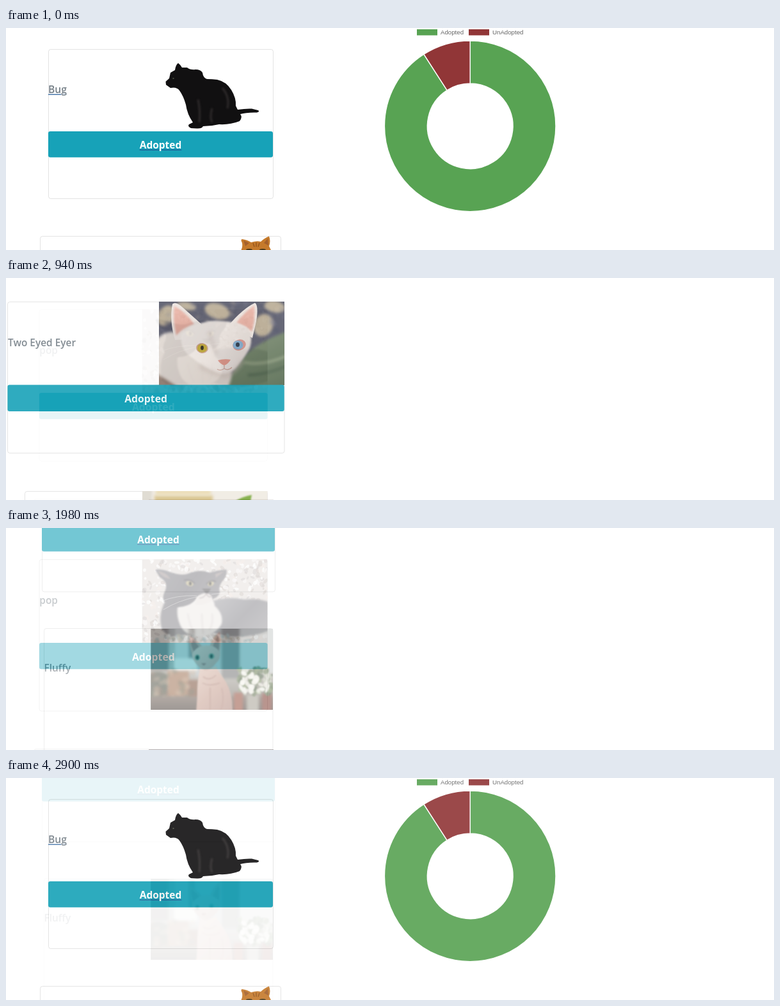
An HTML page with a canvas that plays this animation: 1200x348 px, repeating every 2960 ms.

```html
<!DOCTYPE html>
<html lang="en">
<head>
<meta charset="utf-8">
<title>Cat adoption</title>
<style>
  html, body { margin: 0; width: 100%; height: 100%; overflow: hidden; background: #fff; }
  canvas { display: block; }
</style>
</head>
<body>
<canvas id="stage" width="1200" height="348"></canvas>
<script>
const W = 1200, H = 348;
const HOLD = 200, STEP = 60, SCENE = 740;
const UI = '"Open Sans", "Noto Sans", sans-serif';
const CHART = '"Liberation Sans", Arial, sans-serif';
const TEAL = '#17a2b8', LINK = '#1d5594', GREY = '#757f87';
const GREEN = '#58a353', RED = '#913637';

const stage = document.getElementById('stage').getContext('2d');
let c;

function fill(color, d) {
  c.fillStyle = color;
  c.fill(new Path2D(d));
}

function line(color, width, d) {
  c.strokeStyle = color;
  c.lineWidth = width;
  c.stroke(new Path2D(d));
}

function box(color, x, y, w, h) {
  c.fillStyle = color;
  c.fillRect(x, y, w, h);
}

function oval(color, x, y, rx, ry = rx, turn = 0) {
  c.fillStyle = color;
  c.beginPath();
  c.ellipse(x, y, rx, ry, turn, 0, Math.PI * 2);
  c.fill();
}

function fade(x0, y0, x1, y1, ...colors) {
  const g = c.createLinearGradient(x0, y0, x1, y1);
  colors.forEach((col, i) => g.addColorStop(i / (colors.length - 1), col));
  return g;
}

function soften(px) {
  c.filter = px ? `blur(${px}px)` : 'none';
}

function random(seed) {
  return () => (seed = (seed * 16807) % 2147483647) / 2147483647;
}

// Scatter small blobs over a rectangle.
function specks(seed, n, x, y, w, h, size, colors) {
  const r = random(seed);
  for (let i = 0; i < n; i++) {
    const px = x + r() * w, py = y + r() * h;
    const rx = size * (0.5 + r()), ry = size * (0.4 + r() * 0.7);
    oval(colors[Math.floor(r() * colors.length)], px, py, rx, ry, r() * 3);
  }
}

function label(str, x, y, color, font, back) {
  c.font = font;
  c.textAlign = 'left';
  if (back) {
    // Underline that breaks around descenders
    box(LINK, x, y + 1.6, c.measureText(str).width, 1.2);
    c.strokeStyle = back;
    c.lineWidth = 1.2;
    c.strokeText(str, x, y);
  }
  c.fillStyle = color;
  c.fillText(str, x, y);
}

function card(x, y, right, bottom) {
  c.strokeStyle = 'rgba(0,0,0,.11)';
  c.lineWidth = 1;
  c.beginPath();
  c.roundRect(x, y, right - x, bottom - y, 3.5);
  c.stroke();
}

function button(x, y, right, bottom, base, size, linked) {
  c.fillStyle = TEAL;
  c.beginPath();
  c.roundRect(x, y, right - x, bottom - y, 3.2);
  c.fill();
  const font = `700 ${size}px ${UI}`;
  c.font = font;
  const left = (x + right - c.measureText('Adopted').width) / 2;
  label('Adopted', left, base, '#fff', font, linked && TEAL);
}

function name(str, x, y, size, linked) {
  label(str, x, y, GREY, `600 ${size}px ${UI}`, linked && '#fff');
}

function photo(base, x, y, right, bottom, draw) {
  c.save();
  c.beginPath();
  c.rect(x, y, right - x, bottom - y);
  c.clip();
  box(base, x, y, right - x, bottom - y);
  draw();
  c.restore();
}

function slice(color, from, to) {
  c.beginPath();
  c.arc(725.2, 153.8, 133.8, from, to);
  c.arc(725.2, 153.8, 66.8, to, from, true);
  c.closePath();
  c.fillStyle = color;
  c.fill();
  c.strokeStyle = '#fff';
  c.lineWidth = 1.4;
  c.stroke();
}

function chart() {
  const top = -Math.PI / 2, turn = Math.PI * 2;
  slice(GREEN, top, top + turn * 10 / 11);
  slice(RED, top + turn * 10 / 11, top + turn);
  const font = `9.7px ${CHART}`;
  box(GREEN, 642, 2, 32, 9.5);
  label('Adopted', 679, 9.7, '#666', font);
  box(RED, 723, 2, 32, 9.5);
  label('UnAdopted', 760, 9.7, '#666', font);
}

function blackCat() {
  fill('#111011', `M250 89 L249.5 84 L255 79 L257 70 L264 66 Q265 58 269 55 Q272 57 275 62 L283 62
    Q288 66 296 65 Q304 65 307 70 Q308 78 314 80 Q322 80 330 81 Q344 84 352 97 Q360 110 359 122 L362 128
    Q375 126 384 126.5 L394 129 Q397 131 392 132.5 Q376 132 366 135 Q370 140 365 146
    Q350 152 333 151 L322 153 L308 154 Q306 158 298 157.5 L289 157 Q283 154 286 151
    L292 148 Q283 135 281 120 Q277 106 271 98 Q267 92 257 94 Z`);
  soften(1.5);
  line('rgba(74,68,68,.5)', 3, 'M338 94 Q350 108 346 126 M322 126 Q318 140 322 148 M300 112 Q304 130 302 148');
  soften(0);
  oval('#5f6350', 261.5, 79, 1.3, .8);
}

function gingerCat() {
  fill('#c57a2b', `M367.5 348 Q370 343 369 337 Q366 331 369 331 Q377 332 383 336 Q392 333 398 335
    Q404 329 411 326.5 Q414 334 411 342 L414 348 Z`);
  fill('#a4602b', 'M371 333 L380 337 L374 342 Z M409 330 L403 337 L410 341 Z');
  soften(.6);
  line('#96551c', 1.4, 'M386 337 L388 343 M391 336 L391 343 M396 337 L394 343');
  oval('#4a3a1c', 380, 348, 5, 2);
  oval('#4a3a1c', 401, 348, 5, 2);
  soften(0);
}

function whiteCat() {
  soften(2);
  for (const [x, y, rx, ry, a] of [[250, 59, 12, 17, .5], [282, 44, 15, 6, .2], [330, 52, 20, 12, .3],
    [402, 74, 15, 18, .4], [420, 45, 16, 9, .2]]) {
    oval('#b9ac94', x, y, rx, ry, a);
  }
  specks(71, 50, 239, 37, 196, 50, 4, ['#3c435d55', '#77779044', '#c9bda544']);
  fill(fade(385, 90, 425, 168, '#76876c', '#566a50'), 'M372 122 Q398 98 439 84 V172 H336 Z');
  line('#8d9b7d', 4, 'M372 132 Q400 139 439 122');
  line('#4a5f49', 4, 'M378 152 Q405 152 439 138');
  fill(fade(239, 100, 330, 168, '#e3dcd6', '#d4cbc4'), 'M235 97 Q252 78 272 88 L300 120 L352 142 Q354 160 346 172 H235 Z');
  fill('#8a766a', 'M235 150 Q252 160 270 172 H235 Z');
  soften(.7);
  fill('#ece5e0', 'M264 97 Q255 66 260 41 Q265 36 276 46 L305 72 L296 96 Z M348 74 Q370 48 389 39 Q395 43 391 68 L385 94 Z');
  soften(1.5);
  fill(fade(260, 42, 282, 94, '#eeb9ac', '#dba294'), 'M266 90 Q260 64 263 44 Q278 51 294 72 Q276 78 266 90 Z');
  fill(fade(388, 42, 370, 90, '#eeb9ac', '#dba294'), 'M360 70 Q374 52 388 43 Q390 66 384 84 Q374 74 360 70 Z');
  fill(fade(280, 80, 375, 140, '#f1ebe6', '#e9e2dd', '#d8cfca'), `M274 88 Q296 68 328 67 Q352 66 376 78
    Q388 92 380 112 Q368 132 358 143 Q344 154 330 149 Q306 138 292 126 Q270 112 274 88 Z`);
  soften(3);
  line('#d3c8c2', 4, 'M318 84 Q322 104 330 120');
  line('#bfb0a8', 3, 'M302 138 Q322 151 344 154 Q358 148 370 130');
  soften(.7);
  oval('#c99f92', 306.5, 110, 9.5, 8, .15);
  oval('#b8a02d', 306.5, 110, 7.8, 6.8);
  oval('#2a2616', 306.5, 109.5, 2.4, 3.4);
  oval('#d08f88', 364.5, 105, 10.5, 8.5, -.3);
  oval('#7aa5c8', 362.5, 105, 8, 7);
  oval('#243042', 362, 104.5, 3, 3.6);
  fill('#d99183', 'M331 129 Q341 126 351 128 Q347 135 341 137 Q335 135 331 129 Z');
  line('#c09a90', 1.2, 'M341 137 V142 Q335 146 330 143 M341 142 Q347 146 353 140');
}

function leafyShot() {
  soften(2);
  box('#f0ebe2', 228, 330, 186, 22);
  box('#d8c289', 232, 341, 91, 12);
  box('#eadcb4', 234, 330, 86, 11);
  soften(.8);
  fill('#7aa93c', 'M358 350 Q368 343 384 340 L382 350 Z');
}

function greyCat() {
  soften(.7);
  specks(19, 460, 212, 49, 197, 131, 3.2, ['#f3eeeecc', '#b9a9a2aa', '#eadbd2cc', '#a69c9c77', '#ffffffbb']);
  soften(1.5);
  fill(fade(335, 108, 400, 172, '#85848a', '#636269', '#807d82'), `M318 116 Q346 106 372 112 Q396 110 413 117
    V160 Q380 174 340 169 L312 160 Z`);
  fill('#615f66', 'M248 116 Q237 139 244 160 L256 171 L292 166 L286 112 Z');
  fill('#ece7e3', 'M268 124 Q290 108 306 106 Q326 108 326 122 Q340 134 337 150 Q328 168 304 170 Q280 170 272 152 Q266 138 268 124 Z');
  line('#d3cac6', 2, 'M284 134 Q286 150 294 164 M306 134 Q306 150 308 166 M322 134 Q324 150 318 160');
  soften(.8);
  fill(fade(240, 65, 330, 122, '#6b6a71', '#5b5960', '#716e74'), `M233 65 Q243 64 256 69 Q276 76 286 71 Q304 64 318 70
    Q331 66 344 65 Q347 69 341 80 Q331 90 334 102 Q328 114 316 110 Q306 102 298 110
    Q288 124 266 124 Q240 120 247 102 Q256 86 240 77 Z`);
  fill('#8f8080', 'M237 67 Q251 70 257 80 Q244 78 237 67 Z M341 68 L328 78 L327 72 Z');
  fill('#e6dfdb', 'M298 108 Q308 100 316 103 Q324 106 322 114 Q310 122 296 120 Z');
  oval('#b5a776', 287, 87, 6, 4, .3);
  oval('#191815', 288, 87, 2.2, 3.2);
  oval('#b5a776', 320, 87, 5.2, 4, -.3);
  oval('#191815', 319, 87, 2, 3.2);
  line('#38353b', 1.6, 'M278 82 Q288 79 295 87 M313 88 Q320 80 328 84');
  fill('#2d2a2e', 'M306 95 L320 95 Q317 102 313 103 Z');
  line('#8b7a7d', 1.2, 'M313 103 Q309 110 302 110 M313 103 Q316 110 321 107');
  soften(0);
  line('rgba(245,242,240,.6)', .7, 'M298 106 Q267 105 242 115 M298 108 Q268 114 246 128 M321 104 Q339 103 354 98');
  soften(.8);
  specks(37, 60, 235, 168, 150, 12, 3, ['#7fa3abaa', '#d9dedbcc', '#9b937daa', '#5f6e7099']);
}

function paleCat() {
  soften(2);
  box(fade(0, 158, 0, 285, '#a9adab', '#bdbab2', '#7b746c'), 222, 154, 199, 135);
  box('#7b7774', 222, 154, 32, 70);
  box('#cdd1cf', 264, 154, 22, 72);
  box('#8b8c8b', 286, 154, 10, 62);
  box('#bcc1c1', 296, 154, 41, 78);
  box('#858584', 337, 154, 28, 82);
  box('#cfd3d2', 366, 154, 55, 74);
  box('#f0f0ea', 263, 204, 36, 20);
  fill('#68695e', 'M222 230 Q240 218 254 232 L256 289 H222 Z');
  box('#a98267', 252, 224, 34, 42);
  box('#8a6450', 284, 238, 17, 31);
  specks(53, 35, 228, 220, 66, 50, 5, ['#56665466', '#cdb09466', '#8a685466']);
  box(fade(0, 262, 0, 285, '#85766c', '#5f5650'), 222, 264, 199, 25);
  box('#a0604f', 356, 258, 14, 31);
  box('#8b4f44', 400, 259, 15, 30);
  box('#aeaa9e', 376, 261, 19, 28);
  soften(1.2);
  specks(11, 60, 364, 222, 50, 36, 5, ['#6c7d5acc', '#8a9a70bb', '#53644acc', '#d4d8c4bb']);
  specks(29, 24, 368, 228, 42, 28, 5, ['#f8f6efee', '#efece4cc']);
  soften(.8);
  fill(fade(297, 225, 355, 285, '#dfc3b6', '#cda99b', '#b8948a'), `M304 216 Q316 224 328 217 Q335 229 344 242
    Q355 261 354 289 H297 Q299 266 299 252 Q300 233 304 216 Z`);
  soften(1.2);
  line('#b48d82', 1.4, 'M308 233 Q317 241 328 231 M307 243 Q318 249 334 243 M319 250 V285 M337 251 Q342 268 336 285');
  soften(.8);
  fill('#b8988d', 'M292 202 Q284 181 287 169 Q301 177 308 188 Z M318 187 Q322 172 334 162 Q339 181 332 201 Z');
  fill('#946d66', 'M294 194 Q287 182 290 174 Q298 180 303 189 Z M323 188 Q325 176 332 169 Q335 183 331 195 Z');
  fill(fade(290, 184, 336, 224, '#d6bcaf', '#b4948a'), `M292 195 Q301 183 314 184 Q326 183 334 194
    Q337 204 328 212 Q320 223 311 223 Q302 220 295 210 Q289 202 292 195 Z`);
  oval('#6d8a74', 299, 203, 4, 4.4);
  oval('#202a24', 299, 203, 1.9, 3);
  oval('#6d8a74', 321, 201, 4.6, 4.4);
  oval('#202a24', 321, 201, 1.9, 3);
  fill('#966b65', 'M305 212 H313 L309 216 Z');
}

const scenes = [
  () => {
    card(66.5, 33.5, 417.5, 267.5);
    blackCat();
    name('Bug', 66, 102, 15.6, true);
    button(66, 162, 417, 202.7, 189, 15.5, true);
    card(53.5, 326.5, 429.5, 420);
    gingerCat();
    chart();
  },
  () => {
    card(2.5, 37.5, 435, 274.5);
    photo('#555768', 239, 37, 435, 168, whiteCat);
    name('Two Eyed Eyer', 3, 106.5, 15.4);
    button(2.4, 167.5, 434.8, 209, 195, 15.8);
    card(29.5, 334.5, 408.5, 420);
    photo('#ddd8ce', 213, 334, 408.5, 348, leafyShot);
  },
  () => {
    card(52, 49.5, 408.5, 287);
    photo('#dfd8d3', 212.5, 49, 408.5, 180, greyCat);
    name('pop', 52.3, 119, 15.4);
    button(52, 180, 408.7, 221.3, 207.7, 15.8);
    card(43.5, 346.5, 418.5, 420);
    photo('#54474a', 223, 347, 418, 348, () => {});
  },
  () => {
    card(56.5, -120, 420.5, 100);
    button(56, -4, 420, 36.8, 23.5, 15.5, true);
    card(59.5, 157.5, 417, 420);
    photo('#a09d97', 226.5, 158, 417, 285, paleCat);
    name('Fluffy', 59.5, 225.3, 15.4);
  }
].map(draw => {
  const sheet = document.createElement('canvas');
  sheet.width = W;
  sheet.height = H;
  c = sheet.getContext('2d');
  box('#fff', 0, 0, W, H);
  draw();
  return sheet;
});

// Each scene holds, then dissolves into the next in tenths.
function frame(now) {
  const t = now % (SCENE * scenes.length);
  const i = Math.floor(t / SCENE), local = t - i * SCENE;
  const mix = local < HOLD ? 0 : (Math.floor((local - HOLD) / STEP) + 1) / 10;
  stage.globalAlpha = 1;
  stage.drawImage(scenes[i], 0, 0);
  stage.globalAlpha = mix;
  stage.drawImage(scenes[(i + 1) % scenes.length], 0, 0);
  requestAnimationFrame(() => frame(performance.now()));
}
frame(performance.now());
</script>
</body>
</html>
```
